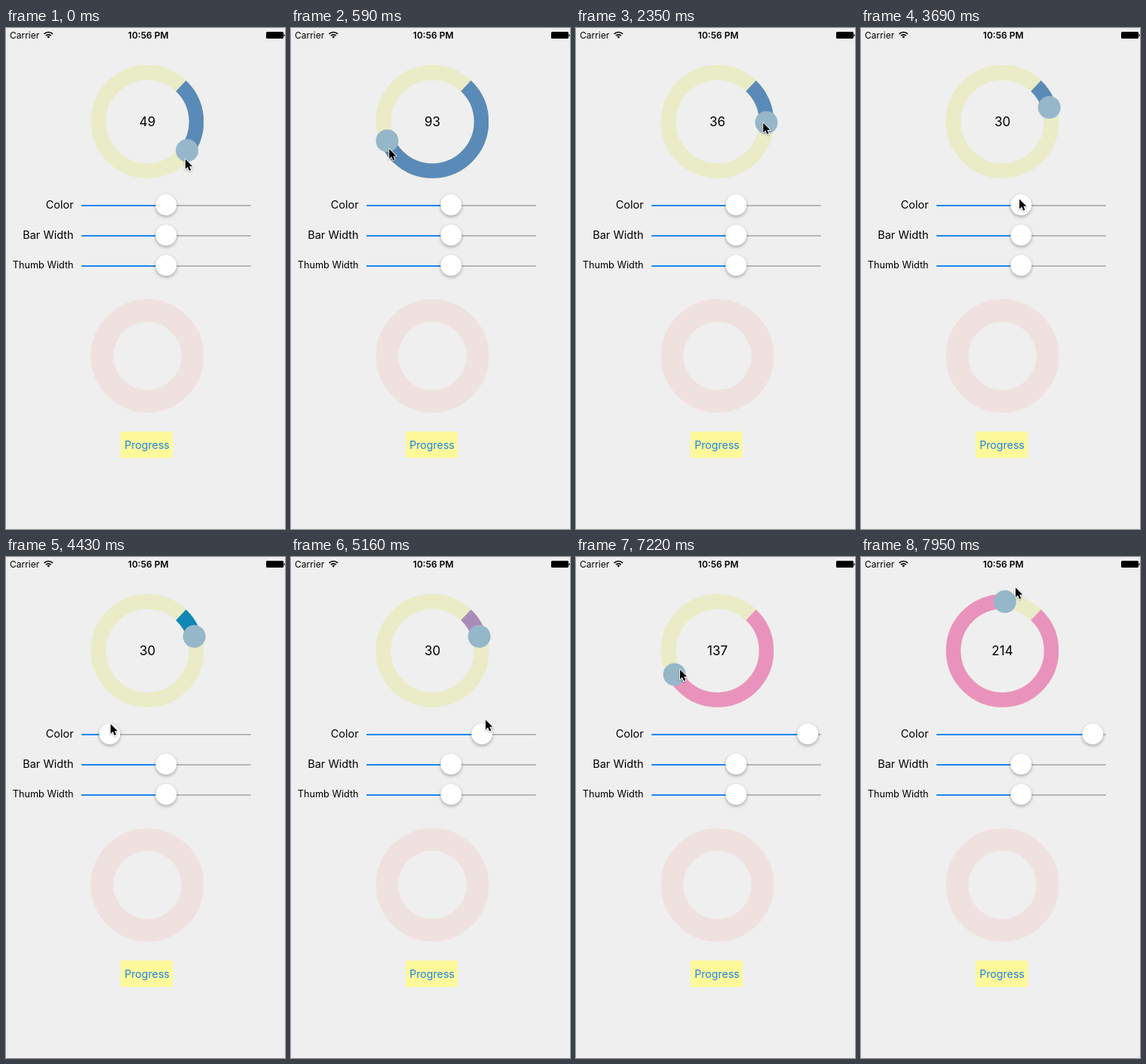
An HTML page that plays this animation: 370x663 px, repeating every 8000 ms.

```html
<!DOCTYPE html>
<html lang="en">
<head>
<meta charset="utf-8">
<title>Circular slider</title>
<style>
  html, body { margin: 0; width: 100%; height: 100%; overflow: hidden; background: #efefef; }
  svg { display: block; width: 370px; height: 663px; }
  text { font-family: Inter, Roboto, "Liberation Sans", sans-serif; font-size: 14.5px; }
  .status { font-size: 12px; }
  .bold { font-weight: 600; }
  .label { text-anchor: end; }
  .small { font-size: 12.7px; }
  .mid { text-anchor: middle; }
  .value { font-size: 17px; }
  .button { font-size: 14.2px; fill: #1e82e0; }
  .ring { fill: none; stroke-width: 20; }
  #arc { stroke-width: 19.5; }
  .knob { fill: #fff; filter: drop-shadow(0 2px 2px rgba(0, 0, 0, .24)) drop-shadow(0 0 .5px rgba(0, 0, 0, .25)); }
  .cursor { stroke: #fff; stroke-width: 1.8; stroke-linejoin: round; paint-order: stroke; filter: drop-shadow(0 1px 1px rgba(0, 0, 0, .3)); }
</style>
</head>
<body>
<svg viewBox="0 0 370 663" width="370" height="663">
  <clipPath id="dial"><rect x="112" y="49" width="150" height="150"/></clipPath>
  <clipPath id="lower"><rect x="112" y="359" width="150" height="150"/></clipPath>
  <rect width="370" height="663" fill="#efefef"/>

  <text class="status" x="5" y="14">Carrier</text>
  <g fill="none" stroke="#000" stroke-width="1.7">
    <path d="M50.6 7.9a8 8 0 0 1 11.4 0M52.9 10.2a4.8 4.8 0 0 1 6.8 0"/>
    <path d="M56.3 13.6l-1.9-1.9a2.7 2.7 0 0 1 3.8 0z" fill="#000" stroke="none"/>
  </g>
  <text class="status bold mid" x="188.7" y="14">10:56 PM</text>
  <rect x="345" y="5" width="23" height="9" rx="1.5"/>
  <path d="M368.5 8.2q1.5 .2 1.5 1.5t-1.5 1.5z"/>

  <g clip-path="url(#dial)">
    <circle class="ring" cx="187.5" cy="124" r="65" stroke="#e9ecc7"/>
    <circle class="ring" id="arc" cx="187.5" cy="124" r="65" pathLength="360" transform="rotate(-46.8 187.5 124)"/>
  </g>
  <circle id="thumb" r="15" fill="#96b7c9"/>
  <text class="mid value" id="value" x="187.5" y="130"></text>

  <text class="label" x="89.6" y="239.3">Color</text>
  <text class="label" x="89.6" y="279.3">Bar Width</text>
  <text class="label small" x="89.6" y="318.3">Thumb Width</text>
  <g id="sliders"></g>

  <circle cx="187.5" cy="434" r="60" fill="none" stroke="#f0e1e1" stroke-width="30" clip-path="url(#lower)"/>
  <rect x="152" y="534" width="69" height="35" fill="#fdf99b"/>
  <text class="mid button" x="187" y="557">Progress</text>

  <path class="cursor" id="cursor" d="M.8 1.5V14.4L3.8 11.6L5.9 16.6L8.1 15.6L6 10.8H10Z"/>
</svg>
<script>
const LOOP = 8000, STEP = 147.4, START = 313.2;
const $ = id => document.getElementById(id);
const mix = (a, b, u) => a + (b - a) * u;
const easeOut = u => 1 - (1 - u) ** 1.25;

// Moves through points [step, value, ...], slowing a little before each
function track(points, p, ease = easeOut) {
  const i = points.findIndex(k => k[0] > p);
  if (i < 1) return points.at(i).slice(1);
  const a = points[i - 1], b = points[i];
  const u = ease((p - a[0]) / (b[0] - a[0]));
  return a.slice(1).map((v, j) => mix(v, b[j + 1], u));
}

const turns = [[0, 35.9], [9, 269.1], [16, 360.9], [18, 343.1], [44, 343.1], [54, 633]];
const slides = [[25, 212.3], [28, 183], [31, 122], [35, 253.3], [39, 307.3]];
// Pointer relative to the thumb
const grips = [[0, -3, 10], [9, 6.5, 9], [16, -5, -1], [18, -5, -1], [44, -2.7, 9], [54, 13.3, -20.2]];
// Share of the pointer's place that follows the slider knob
const hover = [[20, 0], [24, 1], [39, 1], [43, 0]];
const tints = [[122, 0, 134, 182], [212.3, 90, 138, 184], [253.3, 170, 140, 187], [307.3, 233, 147, 188]];

$("sliders").innerHTML = [234, 274, 314].map(y => `
  <rect x="100" y="${y}" width="225" height="2" rx="1" fill="#b6b6b6"/>
  <rect class="fill" x="100" y="${y}" width="112.3" height="2" rx="1" fill="#1c86f3"/>
  <circle class="knob" cx="212.3" cy="${y}" r="14"/>`).join("");
const fill = document.querySelector(".fill"), knob = document.querySelector(".knob");

function draw(t) {
  const step = Math.floor((t + 12) / STEP);
  const [angle] = track(turns, step);
  const sweep = (angle - START + 360) % 360;
  const rad = angle * Math.PI / 180;
  const x = 187.5 + 65 * Math.cos(rad), y = 124 + 65 * Math.sin(rad);
  const [kx] = track(slides, step);
  const tint = track(tints, kx, u => u);

  const [dx, dy] = track(grips, step);
  const [h] = track(hover, step);
  const drift = step - 25;
  const px = mix(x + dx, kx - 3 + .7 * drift, h);
  const py = mix(y + dy, 225 - 1.1 * drift, h);

  // The colour slider also widens the value range
  const value = step <= 44 ? 19.3 + .364 * sweep : 11.4 + .6356 * sweep;

  $("arc").setAttribute("stroke-dasharray", `${sweep} 400`);
  $("arc").setAttribute("stroke", `rgb(${tint.map(Math.round)})`);
  $("thumb").setAttribute("cx", x);
  $("thumb").setAttribute("cy", y);
  $("value").textContent = Math.floor(value);
  fill.setAttribute("width", kx - 100);
  knob.setAttribute("cx", kx);
  $("cursor").setAttribute("transform", `translate(${px} ${py})`);
}

const begin = performance.now();
function tick() {
  draw((performance.now() - begin) % LOOP);
  requestAnimationFrame(tick);
}
tick();
</script>
</body>
</html>
```
